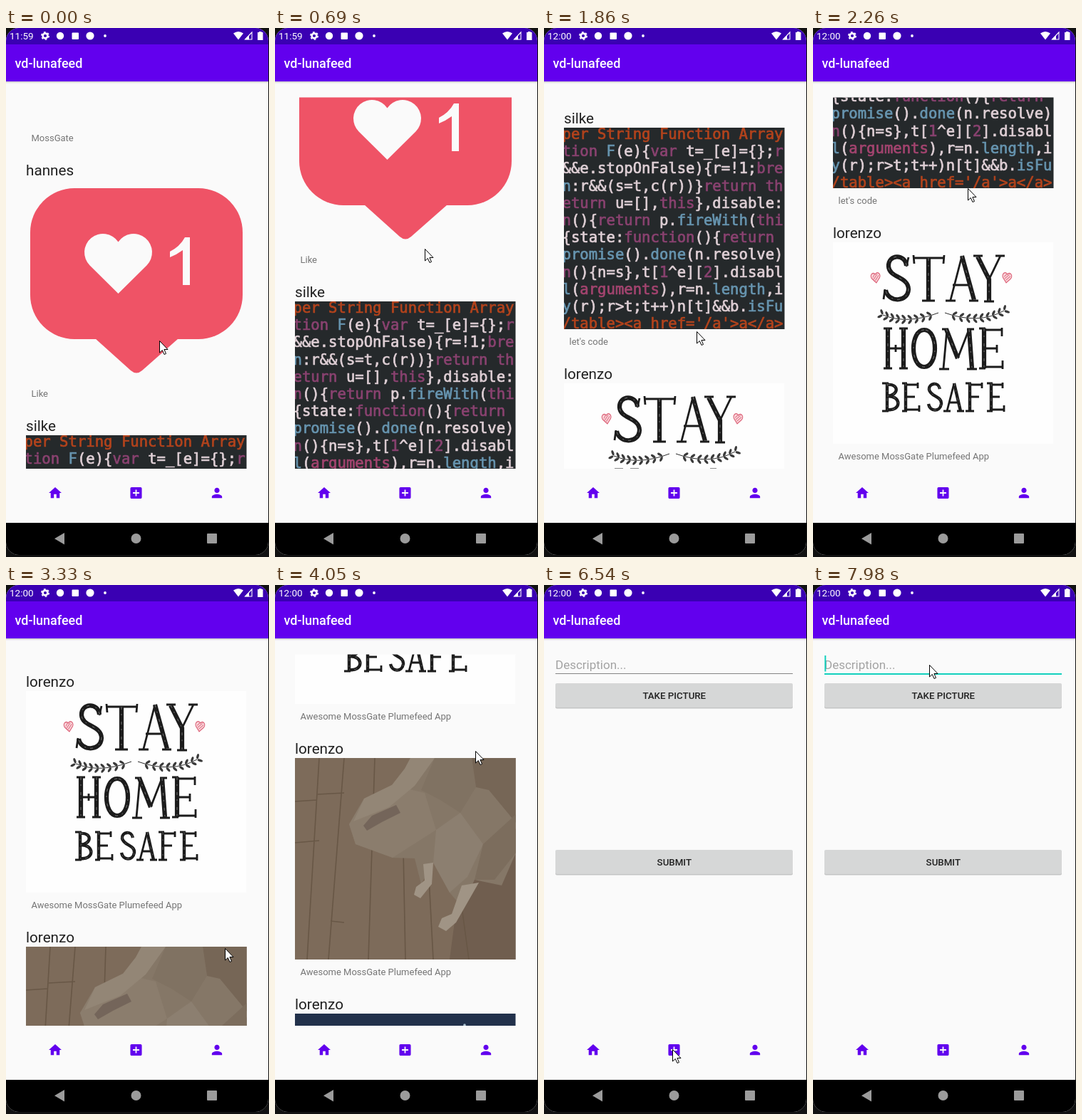
An HTML page for the animation above (8 s loop, 369 by 743 pixels).

```html
<!DOCTYPE html>
<html lang="en">
<head>
<meta charset="utf-8">
<title>Photo feed</title>
<style>
  html, body { margin: 0; height: 100%; overflow: hidden; background: #111; }
  svg { display: block; }
  #stage { width: 100vw; height: 100vh; }
  text { font-family: Roboto, sans-serif; white-space: pre; }
  .name { font-size: 20.7px; fill: #212121; }
  .caption { font-size: 13px; fill: #757575; }
  .code text { font: 20.6px "DejaVu Sans Mono", monospace; stroke-width: .7px; }
  .poster { font-family: Lato, sans-serif; font-weight: 300; fill: #86b4cb; text-anchor: end; }
  .button { font-size: 13.3px; font-weight: 500; fill: #222; text-anchor: middle; }
</style>
</head>
<body>
<svg id="stage" viewBox="0 0 369 743"></svg>
<script>
const LOOP = 8000, PERIOD = 359, FORM_AT = 6540, FOCUS_AT = 7710;
const PURPLE = '#6200ee', TEAL = '#12d0bd';

const HEART = 'M157.5 373L117.6 333.4A26 26 0 1 1 157.5 300.4A26 26 0 1 1 197.4 333.4Z';

const path = (d, attrs) => `<path d="${d}" ${attrs}/>`;
const shape = (d, fill) => path(d, `fill="${fill}"`);
const line = (d, color, width, more = '') =>
  path(d, `fill="none" stroke="${color}" stroke-width="${width}" ${more}`);
const rect = (x, y, w, h, fill, r = 0) =>
  `<rect x="${x}" y="${y}" width="${w}" height="${h}" rx="${r}" fill="${fill}"/>`;
const dot = (x, y, r, fill) => `<circle cx="${x}" cy="${y}" r="${r}" fill="${fill}"/>`;

function badge() {
  return rect(34, 225, 298, 212, '#ef5366', 62) +
    shape('M125 436L175 481Q183 488 191 481L242 436Z', '#ef5366') +
    shape(HEART, '#fafafa') +
    shape('M230 314Q244 307 251 294H258V361H248V312Q240 318 230 322Z', '#fafafa');
}

// Segments split by "|"; the first letter picks the colour.
const CODE = [
  'oper String Function Array',
  'ption |bF|w(e){|pvar |wt=_[e]={};|pr',
  'w&&e.stopOnFalse){r=!1;|pbre',
  'bn|w:r&&(s=t,c(r))}|preturn th',
  'peturn |wu=[],|pthis|w},disable:',
  'pn|w(){|preturn |wp.|bfireWith|w(|pthi',
  'w{state:|pfunction|w(){|preturn',
  'bpromise|w().|bdone|w(n.resolve)',
  'pn|w(){n=s},t[|p1|w^e][|p2|w].disabl',
  'bl|w(|marguments|w),r=n.|blength|w,i',
  'by|w(r);r>t;t++)n[t]&&b.|bisFu',
  "o/table><a href='/a'>a</a>"
];
const INK = { o: '#b3431c', p: '#8a4270', b: '#6795b0', w: '#e0d0d6', m: '#a3446f' };
const esc = s => s.replace(/&/g, '&amp;').replace(/</g, '&lt;');

function codePhoto() {
  const rows = CODE.map((row, i) => {
    const spans = row.split('|')
      .map(s => `<tspan fill="${INK[s[0]]}" stroke="${INK[s[0]]}">${esc(s.slice(1))}</tspan>`).join('');
    return `<text x="25.5" y="${229 + i * 24.2}">${spans}</text>`;
  }).join('');
  return rect(28, 213, 310, 283, '#25292b') + `<g class="code">${rows}</g>`;
}

function sprig(x0, y0, cx, cy, x1, y1) {
  let out = line(`M${x0} ${y0}Q${cx} ${cy} ${x1} ${y1}`, '#2a2a2a', 1);
  for (let i = 0; i < 9; i++) {
    const t = i / 9, u = 1 - t;
    const x = u * u * x0 + 2 * u * t * cx + t * t * x1;
    const y = u * u * y0 + 2 * u * t * cy + t * t * y1;
    const a = Math.atan2(u * (cy - y0) + t * (y1 - cy), u * (cx - x0) + t * (x1 - cx)) * 180 / Math.PI;
    for (const s of [-1, 1])
      out += `<ellipse cx="-4.5" cy="0" rx="3.8" ry="1.7" fill="#3a3a3a" transform="translate(${x} ${y}) rotate(${a + s * 48})"/>`;
  }
  return out;
}

function lettering() {
  const stems = 'M131 334C130 317 105 317 106 335C107 351 134 349 134 367C133 386 105 386 102 368' +
    'M162 323V382M209 320L226 382M231 321L247 353V383' +
    'M105 422V478M127 422V478' +
    'M156 424C136 424 136 476 156 476C176 476 176 424 156 424' +
    'M187 423L203 464M219 423L223 478M240 422V478';
  const small = 'M104 499V538M104 501C121 499 121 516 104 517C125 516 124 539 104 536M130 499V538' +
    'M178 507C176 496 162 499 163 508C165 518 181 517 180 528C178 540 164 539 162 528' +
    'M198 499L207 538M220 499V538M250 499V538';
  const thin = 'M141 323H183M209 320L193 382M196 361H222M247 353L263 320M105 450H127' +
    'M183 478L188 423M203 464L219 423M240 424H265M240 450H258M240 476H265' +
    'M130 501H147M130 518H143M130 536H148M198 499L188 538M190 526H205' +
    'M220 501H237M220 518H233M250 501H266M250 518H262M250 536H267' +
    'M142 331L141 319M183 331L184 319M153 383H171M186 383H200M219 383H232' +
    'M225 320H238M256 320H269M240 384H254M131 335L134 322M101 367L99 381' +
    'M99 422H111M99 478H111M121 422H133M121 478H133M116 445V455' +
    'M177 479H191M216 479H230M181 423H190M216 423H226' +
    'M233 422H242M233 478H242M265 421V433M258 445V456M266 467V479' +
    'M97 499H106M97 538H106M125 499H132M125 538H132M147 498V506M149 530V539' +
    'M183 538H193M202 538H212M214 499H222M214 538H226M237 498V506M244 499H252M244 538H252M266 498V506M268 530V539' +
    'M141 443V457M171 443V457';
  const heart = (x, turn) => `<g transform="translate(${x} 351) rotate(${turn}) scale(.135 .165) translate(-157.5 -331)">` +
    shape(HEART, '#f9d5da') + line(HEART, '#dc6278', 8) +
    line('M128 325L150 300M136 340L178 300M150 352L192 312', '#dc6278', 6) + '</g>';
  const grain = 'stroke-dasharray="4 6 2 9"';
  return rect(28, 213, 310, 283, '#fefefe') + '<g transform="translate(0 -88)">' +
    line(stems, '#1c1c1c', 6.2) + line(small, '#1c1c1c', 4.4) + line(thin, '#1c1c1c', 2.8) +
    line(stems, '#8a8a8a', .8, grain) + line(small, '#8a8a8a', .6, grain) +
    sprig(98, 403, 132, 417, 176, 400) + sprig(268, 397, 232, 417, 185, 400) +
    heart(88, -8) + heart(272, 8) + '</g>';
}

function dogPhoto() {
  return rect(28, 213, 310, 283, '#7d6b5a') + '<g transform="translate(0 122)">' +
    shape('M260 260L338 190V374H245Z', '#705e4f') +
    line('M62 91L45 374M97 91L75 374M140 91L131 374M180 220L183 374M28 210L62 207M97 322L78 320M28 152L58 150M215 240L222 374M262 300L272 374M97 140L60 142', '#685746', 1.6) +
    shape('M104 184L125 148L164 129L182 106L190 91H338V224L318 270L280 262L262 300L245 280L222 238L205 268L196 232L165 231L113 212Z', '#857767') +
    shape('M104 184L125 148L164 129L210 140L226 192L165 231L113 212Z', '#8b7d6d') +
    shape('M125 148L164 129L182 106L190 91H224L196 130L160 160L110 180Z', '#938676') +
    shape('M124 186L136 172L170 157L176 168L150 181L129 193Z', '#74655a') +
    shape('M224 91H276L282 132L260 168L232 150L205 136Z', '#807262') +
    shape('M276 91H338V182L300 136L282 132Z', '#766656') +
    shape('M226 192L260 168L292 212L270 258L245 280L222 238Z', '#8c7f70') +
    shape('M292 212L338 170V224L308 262L280 262Z', '#7c6d5d') +
    shape('M208 240L222 238L220 268L204 288L195 283L198 272L210 263Z', '#a09485') +
    shape('M262 270L286 266L254 322L240 334L229 328L234 316L248 310Z', '#a09485') + '</g>';
}

function spacePoster() {
  const stars = [[74, 478], [266, 466], [161, 481], [193, 533], [127, 546], [52, 585], [218, 500], [300, 478]];
  const edge = 'stroke="#182436" stroke-width="2.5"';
  return rect(28, 213, 310, 283, '#22314b') + '<g transform="translate(0 -237)">' +
    stars.map(([x, y]) => dot(x, y, 1.8, '#a9c0cf')).join('') +
    '<text class="poster" x="104" y="515" font-size="65">HELLO</text>' +
    '<text class="poster" x="104" y="567" font-size="55">WORLD</text>' +
    shape('M28 619L70 606L105 609L140 597L190 590L240 584V640H28Z', '#1a2535') +
    shape('M108 619L140 601L185 594L240 583L338 600V733H28V660Z', '#8b7872') +
    path('M240 598L246 548Q250 522 276 513L345 495V619H262Q240 615 240 598Z', `fill="#4f7d8e" ${edge}`) +
    line('M250 540Q258 527 278 523L338 508M242 600Q280 612 338 604', '#2f5468', 3) +
    `<rect x="256" y="543" width="15" height="49" rx="6" fill="#edcd6d" ${edge}/>` +
    `<rect x="328" y="526" width="18" height="52" rx="6" fill="#edcd6d" ${edge}/>` + '</g>';
}

const posts = [
  ['', '', 'MossGate'],
  ['hannes', badge(), 'Like'],
  ['silke', codePhoto(), "let's code"],
  ['lorenzo', lettering(), 'Awesome MossGate Plumefeed App'],
  ['lorenzo', dogPhoto(), 'Awesome MossGate Plumefeed App'],
  ['lorenzo', spacePoster(), '']
];

const feed = posts.map(([name, art, caption], i) =>
  `<g transform="translate(0 ${(i - 1) * PERIOD})"><text class="name" x="28" y="207">${name}</text>` +
  `<g clip-path="url(#photo)">${art}</g>` +
  `<text class="caption" x="35.5" y="518">${caption}</text></g>`).join('');

const button = (y, label) => rect(16, y + 1, 333, 34.5, '#c4c5c5', 2) + rect(16, y, 333, 34, '#d6d7d7', 2) +
  `<text class="button" x="182.8" y="${y + 22.3}">${label}</text>`;

const icon = (x, d) => path(d, `fill="${PURPLE}" transform="translate(${x} 653) scale(.895) translate(-12 -12)"`);

const statusBar = rect(0, 0, 368, 23, '#3a00b3') +
  '<text id="clock" x="5" y="16" font-size="13.5" fill="#fff"></text>' +
  '<circle cx="55" cy="11" r="3.4" fill="none" stroke="#fff" stroke-width="2.6"/>' +
  '<circle cx="55" cy="11" r="5.2" fill="none" stroke="#fff" stroke-width="1.6" stroke-dasharray="2.7 2.74"/>' +
  dot(76, 11, 5.2, '#fff') + rect(92.5, 6.5, 9.5, 9.5, '#fff', 1) + dot(118, 11, 5.6, '#fff') + dot(139, 11, 1.9, '#fff') +
  shape('M319 7.6Q326 2.5 333 7.6L326 16.5Z', '#fff') +
  line('M345 6V16H335.5Z', '#fff', 1.1) + shape('M341 10.5V16.3H335Z', '#fff') +
  shape('M355 5V6H353V17H360.5V6H358.5V5Z', '#fff');

document.getElementById('stage').innerHTML = `
  <defs>
    <clipPath id="device"><rect width="368" height="740" rx="18"/></clipPath>
    <clipPath id="list"><rect y="97.5" width="368" height="521.5"/></clipPath>
    <clipPath id="photo"><rect x="28" y="213" width="309.5" height="283"/></clipPath>
    <linearGradient id="shade" x2="0" y2="1"><stop stop-color="#c9c9c9"/><stop offset="1" stop-color="#fafafa"/></linearGradient>
  </defs>
  <rect width="369" height="743" fill="#111"/>
  <g clip-path="url(#device)">
    ${rect(0, 0, 368, 743, '#fafafa')}
    ${statusBar}
    ${rect(0, 23, 368, 52, PURPLE)}
    ${rect(0, 75, 368, 3, 'url(#shade)')}
    <text x="12.5" y="56" font-size="18" font-weight="500" fill="#fff">vd-lunafeed</text>
    <g id="feed" clip-path="url(#list)"><g id="scroll">${feed}</g></g>
    <g id="form">
      <text x="16" y="117.5" font-size="17" fill="#a3a3a3">Description...</text>
      <rect id="rule" x="16" y="124" width="333"/>
      <rect id="caret" x="16.3" y="99" width="2" height="22.5" fill="${TEAL}"/>
      ${button(138, 'TAKE PICTURE')}${button(372, 'SUBMIT')}
    </g>
    ${icon(69, 'M10 20v-6h4v6h5v-8h3L12 3 2 12h3v8z')}
    ${icon(182.5, 'M19 3H5c-1.1 0-2 .9-2 2v14c0 1.1.9 2 2 2h14c1.1 0 2-.9 2-2V5c0-1.1-.9-2-2-2zm-2 10h-4v4h-2v-4H7v-2h4V7h2v4h4v2z')}
    ${icon(296, 'M12 12c2.2 0 4-1.8 4-4s-1.8-4-4-4-4 1.8-4 4 1.8 4 4 4zm0 2c-2.7 0-8 1.3-8 4v2h16v-2c0-2.7-5.3-4-8-4z')}
    ${rect(0, 695, 368, 48, '#000')}
    ${shape('M82 709V725.5L68 717.2Z', '#9b9b9b')}${dot(182.5, 717, 7, '#9b9b9b')}${rect(282, 710, 14, 14, '#9b9b9b', 1)}
  </g>
  ${path('M0 0V16.5L3.8 13L6.5 19L9 17.9L6.4 12H11.5Z', 'id="cursor" fill="#fff" stroke="#000" stroke-width="1"')}`;

const $ = id => document.getElementById(id);

// Screen refreshes: step count, time
const beats = [[0, 0], [1, 150], [8, 1080], [9, 1200], [17, 2260], [25, 3330], [32, 4290], [33, 4420],
  [40, 5420], [45, 6130], [48, 6540], [56, 7560], [57, 7710], [59, 7980], [60, 8000]];

// Time, pointer x, pointer y, list offset
const keys = [
  [0, 216, 439, 0], [270, 214, 500, 0], [1080, 208, 126, 371], [1200, 208, 114, 383],
  [1600, 214, 475, 383], [2260, 218, 225, 630], [2660, 222, 104, 752], [2900, 240, 200, 782],
  [3330, 308, 510, 782], [3480, 306, 498, 782], [4290, 270, 98, 1183], [4560, 260, 81, 1199],
  [4700, 260, 81, 1199], [5420, 181, 667, 1199], [5570, 181, 667, 1199], [5700, 177, 659, 1199],
  [5850, 177, 659, 1199], [5980, 179, 655, 1199], [6130, 180, 652, 1199], [6540, 181, 652, 1199],
  [6800, 188, 560, 1199], [7250, 190, 260, 1199], [7560, 164, 112, 1199], [8000, 164, 112, 1199]
];

function hold(t) {
  const i = beats.findIndex(b => b[1] > t);
  const [n0, t0] = beats[i - 1], [n1, t1] = beats[i];
  const step = (t1 - t0) / (n1 - n0);
  return t0 + Math.floor((t - t0) / step + 1e-6) * step;
}

function pose(t) {
  const i = keys.findIndex(k => k[0] > t);
  const a = keys[i - 1], b = keys[i], p = (t - a[0]) / (b[0] - a[0]);
  return a.map((v, j) => v + (b[j] - v) * p);
}

function draw(now) {
  const t = hold(now % LOOP);
  const [, x, y, offset] = pose(t);
  const form = t >= FORM_AT, focus = t >= FOCUS_AT;
  $('cursor').setAttribute('transform', `translate(${Math.round(x) - .5} ${Math.round(y) + .5})`);
  $('scroll').setAttribute('transform', `translate(0 ${-Math.round(offset)})`);
  $('clock').textContent = t < 1700 ? '11:59' : '12:00';
  $('feed').style.display = form ? 'none' : '';
  $('form').style.display = form ? '' : 'none';
  $('caret').style.display = t >= FOCUS_AT + 100 ? '' : 'none';
  $('rule').setAttribute('height', focus ? 2 : 1);
  $('rule').setAttribute('fill', focus ? TEAL : '#858585');
}

let start;
function tick(now) {
  start ??= now;
  draw(now - start);
  requestAnimationFrame(tick);
}
draw(0);
requestAnimationFrame(tick);
</script>
</body>
</html>
```
